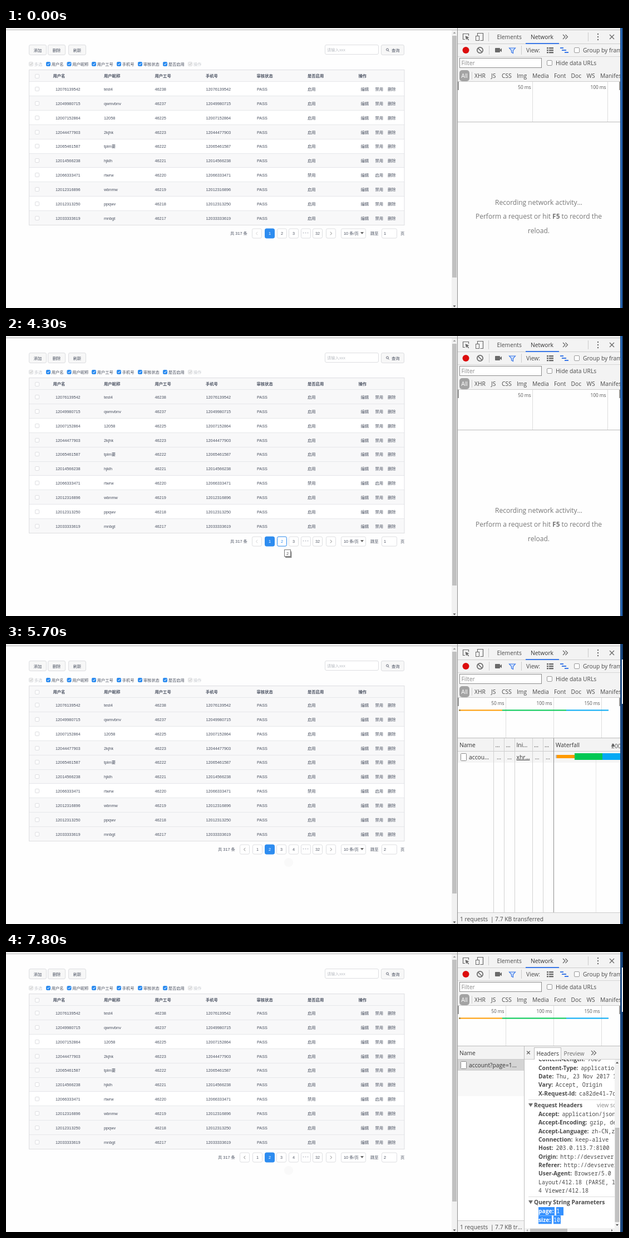
An HTML page for the animation above (8 s loop, 1109 by 505 pixels).

```html
<!DOCTYPE html>
<html lang="zh">
<head>
<meta charset="utf-8">
<style>
html, body { margin: 0; width: 100%; height: 100%; overflow: hidden; background: #fefefe; }
svg { display: block; width: 1109px; height: 505px; }
text { white-space: pre; }
.page { font-family: "Liberation Sans", "Noto Sans CJK SC", "Noto Sans CJK", sans-serif; }
.dev { font-family: "Open Sans", "Noto Sans", sans-serif; }
.mono { font-family: "Noto Sans Mono", "DejaVu Sans Mono", monospace; font-size: 10px; font-weight: 400; }
</style>
</head>
<body>
<svg id="stage" viewBox="0 0 1109 505" xmlns="http://www.w3.org/2000/svg"></svg>
<script>
const LOOP = 8000;
const BLUE = '#2d8cf0', INK = '#495060', EDGE = '#dddee1', DEV = '#4a4a4a', ICON = '#6a6a6a';

// Drawing helpers
const fill = (x, y, w, h, color, extra = '') =>
  `<rect x="${x}" y="${y}" width="${w}" height="${h}" fill="${color}" ${extra}/>`;
const box = (x, y, w, h, color, stroke, r = 0, extra = '') =>
  fill(x + .5, y + .5, w - 1, h - 1, color, `stroke="${stroke}" rx="${r}" ${extra}`);
const path = (d, stroke, width = 1, color = 'none', extra = '') =>
  `<path d="${d}" stroke="${stroke}" stroke-width="${width}" fill="${color}" ${extra}/>`;
const disc = (x, y, r, color, extra = '') =>
  `<circle cx="${x}" cy="${y}" r="${r}" fill="${color}" ${extra}/>`;
const group = (id, body) => `<g id="${id}">${body}</g>`;
const label = (x, mid, str, size, color, extra = '') =>
  `<text x="${x}" y="${mid + size * .36}" font-size="${size}" fill="${color}" ${extra}>${str}</text>`;
const txt = (x, mid, str, color = INK, extra = '') => label(x, mid, str, 7.3, color, extra);
const dev = (x, mid, str, color = DEV, extra = '') => label(x, mid, str, 10.3, color, extra);
const MID = 'text-anchor="middle"', END = 'text-anchor="end"';

const button = (x, w, str, color = INK, edge = EDGE, bg = '#f7f7f7') =>
  box(x, 30, w, 19, bg, edge, 2.5) + txt(x + w / 2, 40, str, color, MID);

function check(x, y, on, off) {
  const bg = off ? '#f0f0f0' : on ? BLUE : '#fff';
  return box(x, y, 8, 8, bg, on && !off ? BLUE : EDGE, 1.5) +
    (on ? path(`M${x + 2},${y + 4}l1.6,1.6l2.8,-3.4`, off ? '#bbb' : '#fff') : '');
}

function toolbar() {
  const filters = [[41, '多选', 1], [72, '用户名'], [109.5, '用户昵称'], [154, '用户工号'],
    [199, '手机号'], [237, '审核状态'], [282, '是否启用'], [327, '操作', 1]];
  return button(41, 32, '添加') + button(75, 32, '删除') + button(112, 32, '刷新') +
    group('hotDelete', button(75, 32, '删除', '#57a3f3', '#57a3f3', '#fff')) +
    box(573, 30, 97, 18, '#fff', EDGE, 2.5) + txt(577, 39.5, '请输入xxx', '#bbbec4') +
    button(674, 42, '') + txt(693, 40, '查询') +
    path('M688.6,42.4l-1.8,-1.8', INK) + disc(685.5, 39, 2, 'none', `stroke="${INK}" stroke-width=".8"`) +
    filters.map(([x, s, off]) => check(x, 61, true, off) + txt(x + 9.7, 65.3, s, off ? '#c5c8ce' : INK)).join('');
}

const users = [['12076139542', 'test4', 46238], ['12049980715', 'qwmvbnv', 46237],
  ['12007152864', '12058', 46225], ['12044477903', '2kjhk', 46223], ['12065461587', 'tplm要', 46222],
  ['12014566238', 'hjklh', 46221], ['12066333471', 'rtwrw', 46220], ['12012316896', 'wbnmw', 46219],
  ['12012313250', 'ppqwv', 46218], ['12033333619', 'mnbgt', 46217]];
const ROW = 25.9;

function table() {
  const heads = ['用户名', '用户昵称', '用户工号', '手机号', '审核状态', '是否启用', '操作'];
  const hovered = [0, 4, 8];
  let out = fill(41, 75, 675, 281, '#fff') + fill(41, 75, 675, 22, '#f8f8f9') + check(52, 83, false);
  heads.forEach((s, i) => out += txt(84.5 + i * 91.5, 86.5, s, INK, 'font-weight="bold"'));
  users.forEach(([phone, name, no], i) => {
    const top = 97 + i * ROW, y = Math.round(top + 12.8), blocked = i === 6;
    const bg = fill(41, top, 675, ROW, '#f8f8f9');
    if (i % 2) out += bg;
    else if (hovered.includes(i)) out += group('row' + i, bg);
    out += fill(41, Math.round(top) - 1, 675, 1, '#e6e7ea') + check(52, y - 4, false);
    const cells = [[89, phone], [176, name], [267.5, no], [359.5, phone], [451, 'PASS'],
      [542, blocked ? '禁用' : '启用'], [637.5, '编辑'], [663.5, blocked ? '启用' : '禁用'], [686, '删除']];
    out += cells.map(([x, s]) => txt(x, y, s)).join('');
  });
  return out + box(41, 75, 675.5, 281, 'none', EDGE);
}

const cell = (x, str, color = '#555b68', edge = EDGE, bg = '#fff') =>
  box(x, 361.5, 18, 18, bg, edge, 2.5) + txt(x + 9, 370.5, str, color, MID);
const chevron = (x, dir, color) => path(`M${x - dir},${367.7}l${2.4 * dir},2.8l${-2.4 * dir},2.8`, color, .9);

function pager(cur) {
  const first = cur === 1 ? 465 : 443, prev = first - 23;
  let out = txt(prev - 39, 370.5, '共 317 条') + cell(prev, '') + chevron(prev + 9, -1, cur === 1 ? '#ccc' : '#777');
  for (let n = 1; n <= cur + 2; n++) {
    const x = Math.round(first + (n - 1) * 21.7);
    out += n === cur ? cell(x, n, '#fff', BLUE, BLUE)
      : cell(x, n) + group(`hot${cur}_${n}`, cell(x, n, BLUE, BLUE));
  }
  return out + txt(679, 370.5, cur);
}

function pagerRest() {
  return cell(530, '') + [534.5, 538.5, 542.5].map(x => disc(x, 369.5, 1, '#bfc3ca')).join('') +
    cell(551, 32) + cell(575, '') + chevron(584, 1, '#777') +
    box(602, 361.5, 45, 18, '#fff', EDGE, 2.5) + txt(607, 370.5, '10 条/页') +
    path('M637,368h6l-3,4z', 'none', 0, '#666') + txt(655, 370.5, '跳至') +
    box(675, 361.5, 28, 18, '#fff', EDGE, 2.5) + txt(709, 370.5, '页');
}

function pageView() {
  return fill(0, 0, 812, 505, '#fefefe') + fill(0, 0, 812, 3, '#f1f1f1') + fill(0, 3, 812, 1, '#bcbcbc') +
    fill(801, 4, 10, 501, '#f1f1f1') + fill(802, 14, 8, 436, '#c1c1c1') +
    path('M803.5,10h5l-2.5,-3z', 'none', 0, '#a0a0a0') + path('M803.5,500.5h5l-2.5,3z', 'none', 0, '#505050') +
    toolbar() + table() +
    group('loading', fill(41, 75, 675, 281, '#fff', 'opacity=".9"') +
      path('M374,211a4.5,4.5 0 0 1 9,0', BLUE, 1, 'none', 'id="spin"') + txt(375, 221, '加载中', BLUE, MID)) +
    pagerRest() + group('pager1', pager(1)) + group('pager2', pager(2)) +
    group('ghost', disc(508, 394, 8, '#f9f9f9')) +
    group('tip', fill(502, 388, 11, 12, '#888') + fill(513, 390, 1, 10, '#ccc') +
      group('tipFace', box(500, 385, 12, 13, '#fff', '#767676') + txt(506, 392, '2', '#555', MID)));
}

const more = (x, y) => path(`M${x},${y - 4}l4,4l-4,4m4.5,-8l4,4l-4,4`, ICON, 1.3);
const cross = (x, y, r) => path(`M${x - r},${y - r}l${2 * r},${2 * r}m0,${-2 * r}l${-2 * r},${2 * r}`, ICON, 1.4);
const fileIcon = (extra = '') => box(817, 197, 11, 14, '#fff', '#8a8a8a', 1, extra);

function devBars() {
  const types = [[842, 'XHR'], [872, 'JS'], [891, 'CSS'], [918, 'Img'], [946, 'Media'],
    [985, 'Font'], [1015.5, 'Doc'], [1043.5, 'WS'], [1068, 'Manifest']];
  return fill(811, 0, 1, 505, '#8f8f8f') + fill(812, 0, 292, 97, '#f3f3f3') +
    fill(812, 0, 292, 3, '#f1f1f1') + fill(812, 3, 292, 1, '#bcbcbc') +
    fill(812, 28, 292, 1, '#ccc') + fill(812, 51, 292, 1, '#d6d6d6') +
    path('M825,20.5h-3.5v-10h10v3.5', ICON, 1.2) + path('M825.5,14l7,3l-2.8,1.2l2.6,3l-1.2,1l-2.6,-3l-1.4,2.4z', 'none', 0, ICON) +
    path('M847.5,15v-5.5h10v13h-5', ICON, 1.2) + box(844, 14, 7, 9, '#f3f3f3', ICON) +
    fill(867, 8, 1, 16, '#ccc') + dev(882.5, 16, 'Elements') + dev(943, 16, 'Network', '#333') +
    fill(934, 27, 60, 2, '#3b78e7') + more(1001, 16) +
    [11, 16, 21].map(y => disc(1064, y, 1.2, ICON)).join('') + fill(1046, 8, 1, 16, '#ccc') + cross(1089, 16, 4) +
    disc(826.5, 40, 6, '#dc0d0d') + disc(852, 40, 5.2, 'none', `stroke="${ICON}" stroke-width="1.7"`) +
    path('M848.5,36.5l7,7', ICON, 1.6) + fill(868, 32, 1, 16, '#ccc') +
    fill(879, 36, 9, 8, ICON, 'rx="1"') + path('M887,40l4,-3.5v7z', 'none', 0, ICON) +
    path('M904.5,36h11l-4,4.6v5l-3,-1.6v-3.4z', '#3b78e7', 1.2, '#cfe0fb') + fill(926, 32, 1, 16, '#ccc') +
    dev(935, 40, 'View:') +
    [35, 39, 43].map(y => fill(972, y, 3, 2.4, ICON) + fill(976, y, 8, 2.4, ICON)).join('') +
    fill(996, 35, 6, 2, '#3b78e7') + fill(999, 39, 8, 2, '#3b78e7') + fill(1004, 43, 7, 2, '#3b78e7') +
    box(1021, 35, 10, 10, '#fff', '#999', 1.5) + dev(1037, 40, 'Group by frame') +
    box(815, 54, 148, 18, '#fff', '#8c8c8c') + dev(818.5, 63.5, 'Filter', '#888') +
    box(972, 58, 10, 10, '#fff', '#999', 1.5) + dev(988, 63.5, 'Hide data URLs') +
    fill(815, 76, 18, 20, '#a3a3a3', 'rx="5"') + dev(824, 86, 'All', '#fff', MID) + fill(837, 79, 1, 14, '#d0d0d0') +
    types.map(([x, s]) => dev(x, 86, s)).join('');
}

const ticks = (x0, step, n) => Array.from({length: n}, (_, i) => {
  const x = x0 + i * step;
  return fill(x, 97, 1, 72, '#dedede') + label(x - 2.5, 107, `${(i + 1) * 50} ms`, 8.3, '#555', END);
}).join('');

const COLORS = ['#ff9a00', '#00c853', '#03a9f4'];
const spans = (edges, y, h, hs = h) => edges.slice(1).map((x, i) =>
  fill(edges[i], i ? y - h / 2 : y - hs / 2, x - edges[i], i ? h : hs, COLORS[i])).join('');
const summary = edges => spans(edges, 119.5, 2) + fill(814, 118.5, 3, 2, '#8a7a40');
const cascade = (edges, tick) => fill(tick, 194, 1, 290, '#e6e6e6') + fill(988, 200, 2, 6, '#bbb') + spans(edges, 203, 12, 6);

function requests() {
  const heads = [[815, 'Name'], [879.5, '…'], [898.5, '…'], [917.5, 'Ini…'], [949, '…'], [968, '…'], [988, 'Waterfall']];
  return fill(812, 170, 292, 23, '#f3f3f3') + fill(812, 193, 292, 1, '#ccc') + fill(812, 194, 292, 20, '#f5f5f5') +
    heads.map(([x, s]) => dev(x, 182, s, '#333')).join('') + path('M1087.5,185h7l-3.5,-6z', 'none', 0, '#666') +
    fileIcon() + dev(832, 204, 'accou…', '#333') + dev(917.5, 204, 'xhr…', '#333', 'text-decoration="underline"') +
    [883, 902, 951.5, 971].map(x => dev(x - 1, 204, '…')).join('') +
    group('cascadeA', cascade([990, 1036, 1104], 1089)) +
    group('cascadeB', cascade([990, 1022, 1072, 1104], 1060) + dev(1088, 184, '200', '#555')) +
    [876, 895, 914, 946, 965].map(x => fill(x, 170, 1, 314, '#d2d2d2')).join('') + fill(984, 170, 1, 314, '#8f8f8f') +
    fill(812, 484, 292, 21, '#f3f3f3') + fill(812, 484, 292, 1, '#ccc') +
    dev(816, 496.5, '1 requests') + dev(871, 496.5, '|') +
    group('sizeA', dev(879, 496.5, '3.4 KB transferred')) + group('sizeB', dev(879, 496.5, '7.7 KB transferred'));
}

const sections = [
  ['General', 0, [['Request URL', 'http://203.0.113.7'], ['', '8ab214960275c/sample/ac'], ['Request Method', 'GET'],
    ['Status Code', '200 OK'], ['Remote Address', '203.0.113.7'], ['Referrer Policy', 'no-referrer']]],
  ['Response Headers', 1069, [['Access-Control-Allow-Methods', ''], ['', 'TE'], ['Access-Control-Allow-Origin', ''],
    ['Connection', 'keep-alive'], ['Content-Length', '7603'], ['Content-Type', 'application/json'],
    ['Date', 'Thu, 23 Nov 2017 10'], ['Vary', 'Accept, Origin'], ['X-Request-Id', 'ca82de41-7c']]],
  ['Request Headers', 1062, [['Accept', 'application/json'], ['Accept-Encoding', 'gzip, deflate'],
    ['Accept-Language', 'zh-CN,zh'], ['Connection', 'keep-alive'], ['Host', '203.0.113.7:8100'],
    ['Origin', 'http://devserver'], ['Referer', 'http://devserver'], ['User-Agent', 'Browser/5.0 ('],
    ['', 'Layout/412.18 (PARSE, li'], ['', '4 Viewer/412.18']]],
  ['Query String Parameters', 0, [['page', '1'], ['size', '10']]]
];

function headers() {
  let y = 204, out = '';
  sections.forEach(([title, link, rows], i) => {
    if (i) out += fill(939, Math.round(y - 10), 155, 1, '#ddd');
    out += path(`M939,${y - 3}h8l-4,6.5z`, 'none', 0, '#6e6e6e') + dev(949, y, title, DEV, 'font-weight="bold"') +
      (link ? dev(link, y, 'view source', '#888') : '');
    y += 16.5;
    rows.forEach(([key, value]) => {
      const status = key === 'Status Code';
      const id = i === 3 ? key : '';
      if (id) {
        const gap = key === 'page' ? 986 : 981;
        out += group(id + 'Key', fill(957, y - 7.5, gap - 957, 15, '#3390ff')) +
          group(id + 'Value', fill(gap + 3, y - 7.5, 13, 15, '#3390ff'));
      }
      if (status) out += disc(1031, y - .5, 4.5, '#22c522');
      const body = (key ? `${key}: ` : '') + `<tspan class="mono" dx="${status ? 15 : key ? 2 : 0}">${value}</tspan>`;
      out += dev(957, y, body, id ? '' : DEV, `font-weight="bold" ${id ? `id="${id}Text"` : ''}`);
      y += 15.3;
    });
    y += 5.7;
  });
  return out;
}

function details() {
  return fill(812, 170, 292, 335, '#fff') + fill(812, 170, 292, 23, '#f3f3f3') + fill(812, 193, 292, 1, '#ccc') +
    fill(812, 214, 119, 46, '#f8f8f8') +
    dev(815, 182, 'Name', '#333') + fill(812, 194, 119, 20, '#3879d9', 'id="picked"') + fileIcon('id="pickedIcon"') +
    dev(832, 204, 'account?page=1…', '#fff', 'id="pickedText"') +
    fill(812, 484, 119, 21, '#f3f3f3') + fill(812, 484, 119, 1, '#ccc') +
    dev(816, 496.5, '1 requests') + dev(871, 496.5, '|') + dev(879, 496.5, '7.7 KB tr…') +
    fill(931, 170, 1, 335, '#bdbdbd') + cross(939, 181.5, 2.8) +
    box(949, 172, 49, 22, '#fff', '#bbb') + fill(950, 193, 47, 1, '#fff') +
    dev(953.5, 183, 'Headers', '#333') + dev(1002.5, 183, 'Preview', '#6a6a6a') + more(1052, 182) +
    `<g clip-path="url(#pane)">${group('scroll', headers())}</g>` +
    fill(1094, 194, 9, 304, '#f1f1f1') + fill(1094.5, 205, 8, 170, '#c1c1c1', 'id="thumb"') +
    path('M1096,201h5l-2.5,-3z', 'none', 0, '#505050') + path('M1096,491h5l-2.5,3z', 'none', 0, '#505050') +
    fill(932, 498, 172, 7, '#f1f1f1') + fill(942, 499, 67, 6, '#c1c1c1') +
    path('M938,500v4l-2.5,-2z', 'none', 0, '#a0a0a0') + path('M1088,500v4l2.5,-2z', 'none', 0, '#505050');
}

function devView() {
  const note = (y, s) => label(957.5, y, s, 12, '#777', MID);
  return `<g clip-path="url(#tools)">` + devBars() +
    fill(812, 97, 292, 408, '#fefefe') + fill(812, 96, 292, 1, '#ccc') +
    group('ticksA', ticks(946, 135, 2)) + group('ticksB', ticks(898, 86, 3)) +
    group('barA', summary([814, 912, 1058])) + group('barB', summary([814, 892, 1007, 1083])) +
    fill(812, 97, 2, 15, '#9a9a9a') + fill(1102, 97, 2, 15, '#9a9a9a') + fill(812, 169, 292, 1, '#bbb') +
    group('note', note(314.5, 'Recording network activity…') +
      note(340, 'Perform a request or hit <tspan font-weight="bold">F5</tspan> to record the') + note(365.5, 'reload.')) +
    group('requests', requests()) + group('details', details()) + '</g>' +
    fill(1104, 0, 5, 505, '#123a6b') + fill(1105, 0, 2, 505, '#2f74c8', 'id="rim"') +
    group('behind', fill(1107, 28, 2, 80, '#f0f0f0'));
}

const clip = (id, x, y, w, h) => `<clipPath id="${id}"><rect x="${x}" y="${y}" width="${w}" height="${h}"/></clipPath>`;
document.getElementById('stage').innerHTML =
  `<defs>${clip('tools', 811, 0, 293, 505)}${clip('pane', 932, 194, 162, 304)}</defs>` +
  `<g class="page">${pageView()}</g><g class="dev">${devView()}</g>`;

const parts = {};
document.querySelectorAll('svg [id]').forEach(el => parts[el.id] = el);
const set = (id, name, value) => parts[id].setAttribute(name, value);
const fade = (id, k) => set(id, 'opacity', k);
const show = (id, on) => set(id, 'display', on ? 'inline' : 'none');
const ramp = (t, a, b) => Math.min(1, Math.max(0, (t - a) / (b - a)));

function select(id, keyOn, valueOn) {
  show(id + 'Key', keyOn);
  show(id + 'Value', valueOn);
  set(id + 'Text', 'fill', keyOn ? '#fff' : DEV);
}

function render(time) {
  const t = Math.floor(time / 100) * 100;
  const turned = t >= 5000, sent = t >= 5100, done = t >= 5400;

  fade('hotDelete', ramp(t, 1200, 1500) * (1 - ramp(t, 1800, 2000)));
  fade('row0', ramp(t, 1900, 2100));
  fade('row4', ramp(t, 2200, 2400));
  fade('row8', ramp(t, 5000, 5200));

  show('pager1', !turned);
  show('pager2', turned);
  fade('hot1_2', ramp(t, 3600, 3800));
  fade('hot1_3', 0);
  fade('hot2_1', 1 - ramp(t, 5000, 5400));
  fade('hot2_3', ramp(t, 4950, 5200) * (1 - ramp(t, 5400, 5700)));
  fade('hot2_4', 0);

  fade('tip', ramp(t, 4000, 4300) * (1 - ramp(t, 5200, 5400)));
  fade('tipFace', 1 - .8 * ramp(t, 5000, 5200));
  show('ghost', done);
  fade('loading', .55 * ramp(t, 5000, 5200) * (1 - ramp(t, 5300, 5700)));
  set('spin', 'transform', `rotate(${(t - 5200) * .36} 378.5 211)`);

  set('rim', 'fill', turned ? '#1d4f8c' : '#2f74c8');
  show('behind', turned);
  show('note', !sent);
  show('requests', sent);
  show('ticksA', !done);
  show('ticksB', done);
  show('barA', sent && !done);
  show('barB', done);
  ['cascade', 'size'].forEach(id => { show(id + 'A', !done); show(id + 'B', done); });

  show('details', t >= 5900);
  const scroll = t < 6700 ? 0 : t < 6800 ? 100 : 202;
  set('scroll', 'transform', `translate(0 ${-scroll})`);
  set('thumb', 'y', 205 + scroll * 112 / 202);
  const dragged = t >= 7600;
  set('picked', 'fill', dragged ? '#d4d4d4' : '#3879d9');
  set('pickedIcon', 'stroke', dragged ? '#8a8a8a' : '#fff');
  set('pickedText', 'fill', dragged ? '#333' : '#fff');
  select('page', dragged, t >= 7700);
  select('size', t >= 7800, t >= 7800);
}

const start = performance.now();
function frame() {
  render((performance.now() - start) % LOOP);
  requestAnimationFrame(frame);
}
frame();
</script>
</body>
</html>
```
